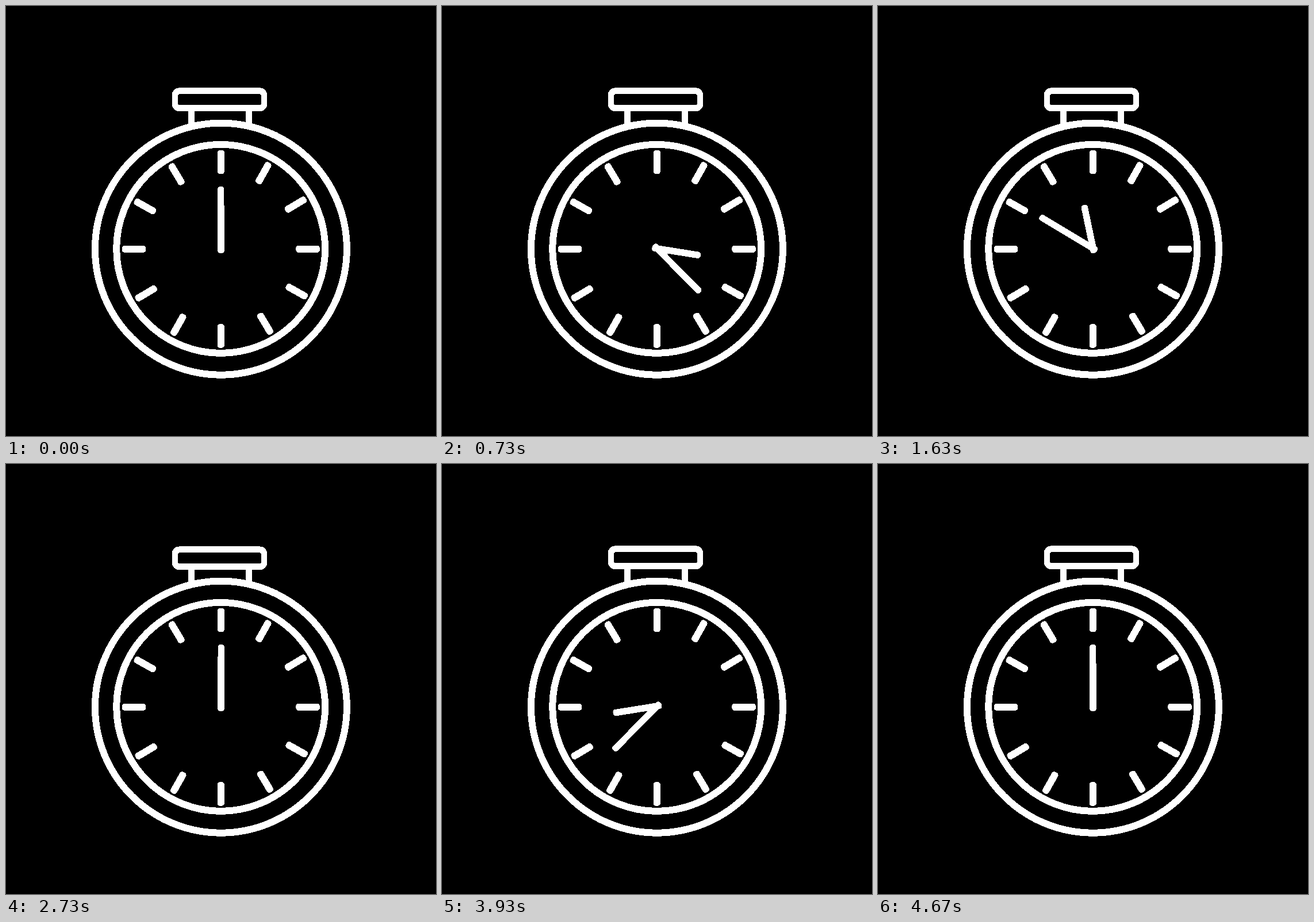
An HTML page that plays this animation: 748x748 px, repeating every 5.41 s.

```html
<!DOCTYPE html>
<html lang="en">
<head>
<meta charset="utf-8">
<title>Stopwatch</title>
<style>
  html, body { margin: 0; width: 100%; height: 100%; overflow: hidden; background: #000; }
  svg { display: block; width: 100vw; height: 100vh; shape-rendering: crispEdges; }
  .line { fill: none; stroke: #fff; stroke-width: 12; }
  .solid { fill: #fff; }
</style>
</head>
<body>
<svg viewBox="0 0 748 748">
  <path class="line" d="M322.8 179V207M422.2 179V207" style="stroke-width:10.8"/>
  <rect id="cap" x="294" y="147.8" width="155" height="30" rx="7.5"
        fill="#000" stroke="#fff" stroke-width="10.8"/>
  <circle class="line" cx="373.9" cy="422.7" r="219"/>
  <circle class="line" cx="373.7" cy="422.4" r="181.5"/>
  <g id="ticks" class="solid"></g>
  <g class="solid" transform="translate(373.8 421.5)">
    <rect id="minute" x="-5.6" y="-107.5" width="11.2" height="116" rx="4.3"/>
    <rect id="hour" x="-5.4" y="-77" width="11.5" height="85.5" rx="4.3"/>
  </g>
</svg>
<script>
const LOOP = 5410, CYCLE = 2700, LAST = 59, TURN = 1800;
const $ = id => document.getElementById(id);
const rotate = (el, deg) => el.setAttribute('transform', `rotate(${deg})`);

for (let i = 0; i < 12; i++) {
  const tick = document.createElementNS('http://www.w3.org/2000/svg', 'rect');
  const size = { x: -6.1, y: -172, width: 12.2, height: 41.5, rx: 4.6 };
  for (const k in size) tick.setAttribute(k, size[k]);
  const lean = i % 3 ? -0.7 : 0;
  tick.setAttribute('transform', `translate(373.8 422.7) rotate(${i * 30 + lean})`);
  $('ticks').append(tick);
}

// First half of the minute hand's sweep: step, degrees, degrees per step.
const SWEEP = [[0, 0, 0], [10, 59, 16], [17, 254.7, 40.3], [22, 495.4, 52.6], [29.5, 900, 54.4]];

function sweep(step) {
  if (step > LAST / 2) return TURN - sweep(LAST - step);
  const i = SWEEP.findIndex(p => step <= p[0]) || 1;
  const [x0, y0, v0] = SWEEP[i - 1], [x1, y1, v1] = SWEEP[i];
  const w = x1 - x0, u = (step - x0) / w, r = 1 - u;
  return y0 * r * r * (1 + 2 * u) + y1 * u * u * (3 - 2 * u) + w * u * r * (v0 * r - v1 * u);
}

// The cap dips once at the start and once at the end of each run.
function dip(step) {
  const edge = Math.min(step, LAST - step);
  const u = Math.max(0, 1 - Math.abs(edge - 5) / 5);
  return 10 * u * u * (3 - 2 * u);
}

// 30 steps a second, each starting on a multiple of 10 ms.
const stepTime = n => Math.round(n * 10 / 3) * 10;

function stepAt(t) {
  let n = Math.floor(t * 0.03) + 1;
  while (stepTime(n) > t) n--;
  return n;
}

function draw(t) {
  const run = t >= CYCLE ? 81 : 0;
  const step = Math.min(LAST, stepAt(t) - run);
  const angle = sweep(step);
  rotate($('minute'), angle);
  rotate($('hour'), angle / 5);
  $('cap').setAttribute('transform', `translate(0 ${dip(step)})`);
}

const start = performance.now();
function play() {
  draw((performance.now() - start) % LOOP);
  requestAnimationFrame(play);
}
draw(0);
requestAnimationFrame(play);
</script>
</body>
</html>
```
